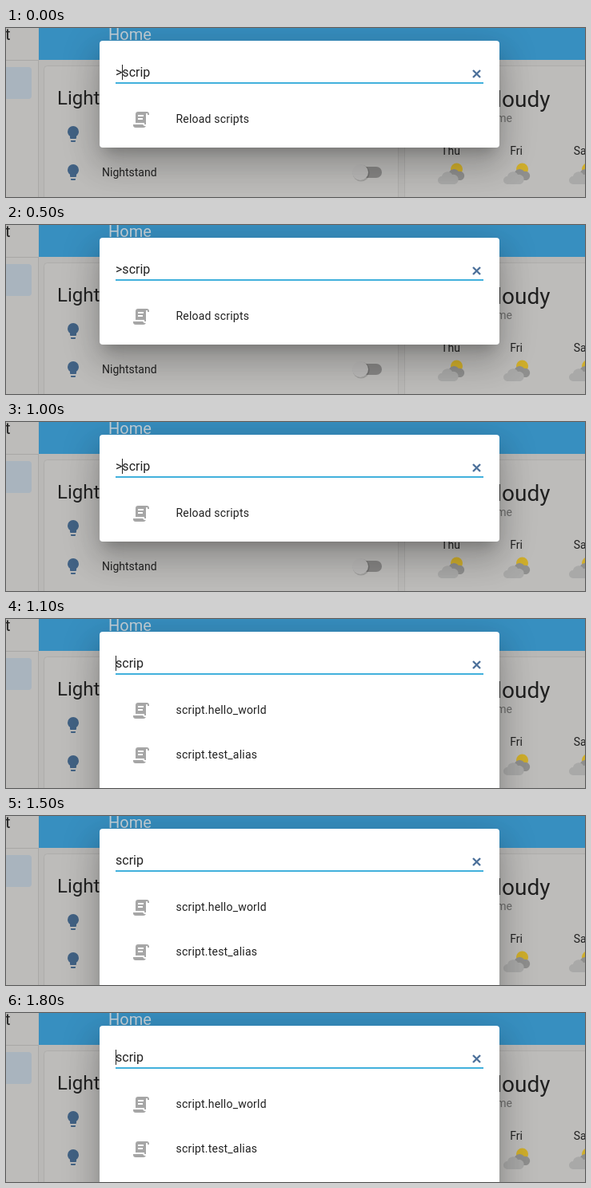
These frames come from a looping animation (724 by 212 pixels, 2100 ms). An HTML page:

```html
<!DOCTYPE html>
<html lang="en">
<head>
<meta charset="utf-8">
<title>Quick bar</title>
<style>
  html, body { margin: 0; width: 100%; height: 100%; overflow: hidden; background: #bdbcba; }
  .stage { position: relative; width: 724px; height: 212px; overflow: hidden; }
  svg { position: absolute; left: 0; top: 0; width: 724px; height: 212px; }
  text { font-family: Roboto, sans-serif; font-size: 14px; fill: #212121; }
  .title { font-size: 20px; fill: #c3d0d8; }
  .field { font-size: 16px; }
  .item { letter-spacing: .2px; }
  .dialog {
    position: absolute; left: 117px; top: 16px; width: 500px; height: 134px;
    background: #fff; border-radius: 4px;
    box-shadow: 0 11px 15px -7px rgba(0,0,0,.2), 0 24px 38px 3px rgba(0,0,0,.14), 0 9px 46px 8px rgba(0,0,0,.12);
    animation: grow 2.1s step-end infinite;
  }
  .commands { animation: first 2.1s step-end infinite; }
  .entities { animation: second 2.1s step-end infinite; }
  .caret { animation: blink 2.1s step-end infinite; }

  /* the query loses its ">" at 1100 ms */
  @keyframes grow { 0% { height: 134px; } 52.381%, 100% { height: 290px; } }
  @keyframes first { 0% { visibility: visible; } 52.381%, 100% { visibility: hidden; } }
  @keyframes second { 0% { visibility: hidden; } 52.381%, 100% { visibility: visible; } }
  /* caret toggles every 500 ms, starting at 200 ms */
  @keyframes blink {
    0%, 33.333%, 80.952%, 100% { opacity: 1; }
    9.524%, 57.143% { opacity: 0; }
  }
</style>
</head>
<body>
<div class="stage">
  <svg viewBox="0 0 724 212">
    <defs>
      <path id="bulb" fill="#426284" d="M12 2A7 7 0 0 0 5 9C5 11.38 6.19 13.47 8 14.74V17A1 1 0 0 0 9 18H15A1 1 0 0 0 16 17V14.74C17.81 13.47 19 11.38 19 9A7 7 0 0 0 12 2M9 21A1 1 0 0 0 10 22H14A1 1 0 0 0 15 21V20H9Z"/>
      <path id="scroll" fill="#a6a6a6" d="M17.8 20C17.4 21.2 16.3 22 15 22H5C3.3 22 2 20.7 2 19V18H14.2C14.6 19.2 15.7 20 17 20ZM19 2C20.7 2 22 3.3 22 5V6H20V5C20 4.4 19.6 4 19 4C18.4 4 18 4.4 18 5V18H17C16.4 18 16 17.6 16 17V16H5V5C5 3.3 6.3 2 8 2ZM8 6V8H15V6ZM8 10V12H14V10Z"/>
      <g id="weather">
        <circle cx="7.5" cy="-7" r="7.5" fill="#cfae2c"/>
        <path fill="#8f8f8e" d="M-3 7A5 5 0 0 1-2-3A7 7 0 0 1 10-4A5.5 5.5 0 0 1 13 7Z"/>
        <path fill="#a9a9a8" d="M-11 12A5 5 0 0 1-11 2A7 7 0 0 1 2 0A6 6 0 0 1 5 12Z"/>
      </g>
    </defs>
    <rect width="724" height="212" fill="#b9b8b6"/>
    <rect width="40" height="212" fill="#bdbcba"/>
    <path d="M0 40.5H40M40.5 40V212" stroke="#a9a8a6"/>
    <rect x="-8" y="49" width="40" height="40" rx="4" fill="#a9b4be"/>
    <rect x="41" width="683" height="40" fill="#378fc0"/>
    <g fill="#bdbcba" stroke="#aeadab">
      <rect x="47.5" y="47.5" width="443" height="190" rx="4"/>
      <rect x="498.5" y="47.5" width="240" height="190" rx="4"/>
    </g>
    <text class="title" x="128" y="15">Home</text>
    <text x="-1" y="15" font-size="20" style="font-size:20px">t</text>
    <text x="64" y="96" style="font-size:24px">Lights</text>
    <use href="#bulb" x="72" y="121"/>
    <use href="#bulb" x="72" y="169"/>
    <text x="120" y="186">Nightstand</text>
    <rect x="436" y="174" width="34" height="14" rx="7" fill="#878685"/>
    <circle cx="444" cy="182" r="10.5" fill="#000" opacity=".15"/>
    <circle cx="443" cy="181" r="10" fill="#bab9b8"/>
    <text x="680.5" y="99" text-anchor="end" style="font-size:28px">Cloudy</text>
    <text x="633" y="118" text-anchor="end" style="fill:#6b6b6a">Home</text>
    <g text-anchor="middle">
      <text x="556" y="159">Thu</text>
      <text x="638" y="159">Fri</text>
      <text x="720" y="159">Sat</text>
    </g>
    <use href="#weather" x="556" y="184"/>
    <use href="#weather" x="638" y="184"/>
    <use href="#weather" x="720" y="184"/>
  </svg>

  <div class="dialog"></div>

  <svg viewBox="0 0 724 212">
    <rect x="137" y="68" width="460" height="2" fill="#41b0dc"/>
    <path d="M584 53L593 62M593 53L584 62" stroke="#4d719b" stroke-width="2.4"/>
    <use href="#scroll" x="157" y="103"/>
    <g class="commands">
      <text class="field" x="137" y="61">&gt;scrip</text>
      <rect class="caret" x="145" y="46" width="1" height="19" fill="#212121"/>
      <text class="item" x="212.5" y="119">Reload scripts</text>
    </g>
    <g class="entities">
      <text class="field" x="137" y="61">scrip</text>
      <rect class="caret" x="137" y="46" width="1" height="19" fill="#212121"/>
      <text class="item" x="212.5" y="119">script.hello_world</text>
      <use href="#scroll" x="157" y="159"/>
      <text class="item" x="212.5" y="175">script.test_alias</text>
    </g>
  </svg>
</div>
</body>
</html>
```
